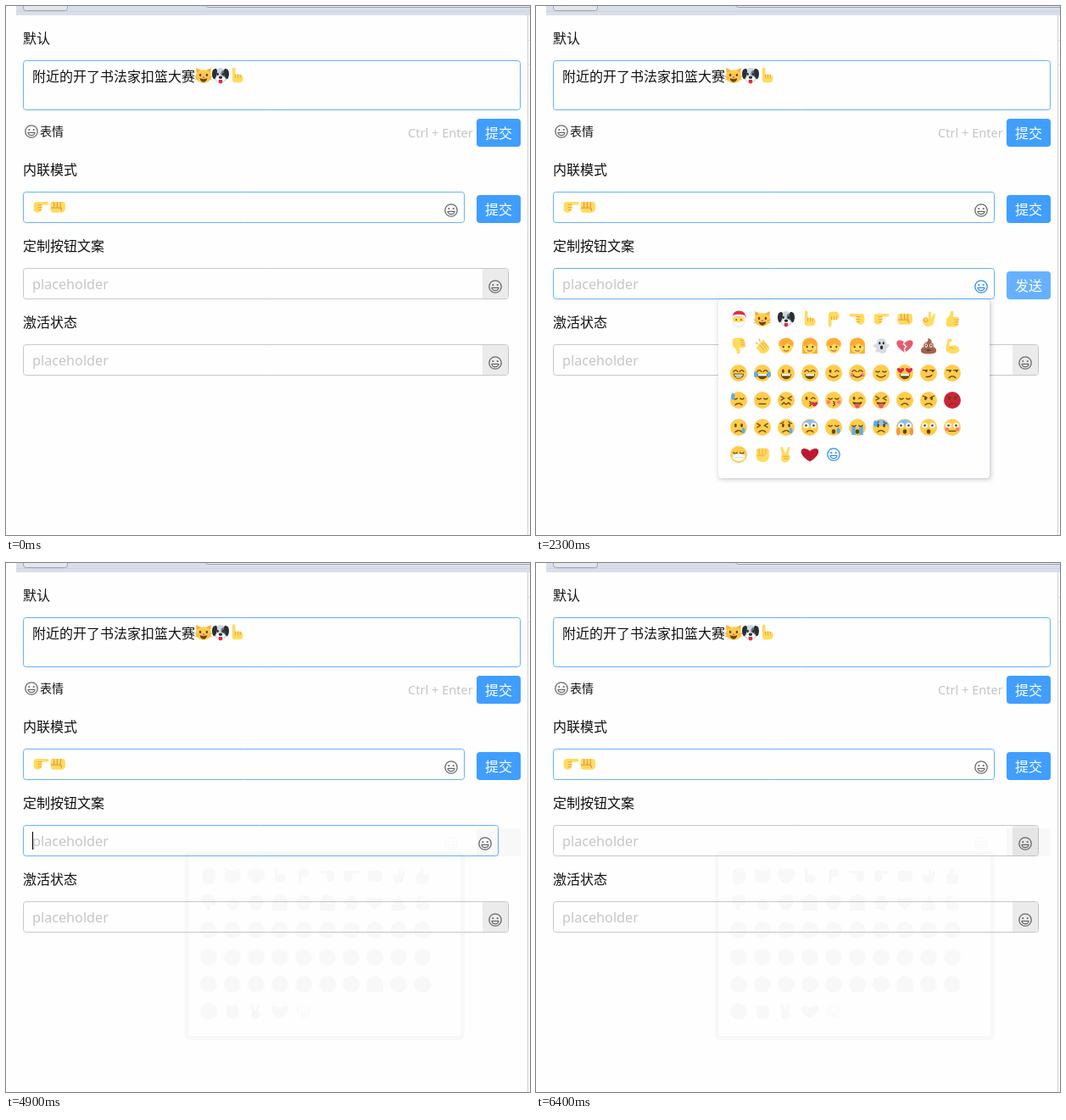
An HTML page with a canvas that plays this animation: 618 by 624 pixels, repeating every 8 s.

```html
<!DOCTYPE html>
<html lang="zh">
<head>
<meta charset="utf-8">
<title>Emoji input</title>
<style>
html, body { margin: 0; width: 100%; height: 100%; overflow: hidden; background: #fefefe; }
canvas { display: block; }
</style>
</head>
<body>
<canvas id="stage" width="618" height="624"></canvas>
<script>
const W = 618, H = 624, LOOP = 8000;
const ctx = document.getElementById('stage').getContext('2d');

const CJK = '"Noto Sans CJK SC", "Noto Sans CJK", "Noto Sans CJK JP", sans-serif';
const LATIN = '"Noto Sans", "Open Sans", sans-serif';
const PAGE = '#fefefe', BLUE = '#409eff', LIGHT = '#66b1ff', GREY = '#c8c8c8', ICON = '#66696e';

// ---- emoji, drawn on a 36 x 36 grid ----
const BROWN = '#664500', YELLOW = '#ffcc4d', SKIN = '#ffdc5d', LINE = '#ef9645', HAIR = '#ffac33';
const RED = '#dd2e44', PINK = '#e8596e', TEAR = '#5dadec', WHITE = '#fff', DARK = '#292f33';

const oval = (x, y, rx, ry = rx) =>
  `M${x - rx} ${y}a${rx} ${ry} 0 1 0 ${2 * rx} 0a${rx} ${ry} 0 1 0 ${-2 * rx} 0z`;
const pair = (dx, y, rx, ry) => oval(18 - dx, y, rx, ry) + oval(18 + dx, y, rx, ry);
const heart = (x, y, s) =>
  `M${x} ${y + s}C${x - 2 * s} ${y - .2 * s} ${x - s} ${y - 1.3 * s} ${x} ${y - .4 * s}` +
  `C${x + s} ${y - 1.3 * s} ${x + 2 * s} ${y - .2 * s} ${x} ${y + s}z`;
const GRIN = 'M8 20h20q-1 9-10 9t-10-9z';

// each part is a list of layers: colour, path, optional stroke width
const parts = {
  face: [[YELLOW, oval(18, 18, 18)]],
  rage: [[  '#d0213d', oval(18, 18, 18)]],
  pale: [['#8fc0ea', 'M.5 15a18 18 0 0 1 35 0z']],

  dots: [[BROWN, pair(6.5, 14, 2.5, 4)]],
  happy: [[BROWN, 'M7 15q4.5-6 9 0M20 15q4.5-6 9 0', 2.4]],
  shut: [[BROWN, 'M7 14q4 4 8 0M21 14q4 4 8 0', 2.2]],
  squint: [[BROWN, 'M7 10l7 4-7 4M29 10l-7 4 7 4', 2.4]],
  wink: [[BROWN, oval(11, 14, 2.5, 3.5)], [BROWN, 'M21 15q4-5 8 0', 2.2]],
  side: [[BROWN, 'M6 12h9M21 12h9', 2], [BROWN, oval(13, 14, 2.2) + oval(27, 14, 2.2)]],
  wide: [[WHITE, pair(8, 14, 6)], [BROWN, pair(8, 14, 2.5)]],
  hearts: [[RED, heart(9, 12, 6.5) + heart(27, 12, 6.5)]],
  cross: [[BROWN, 'M6 9l9 4M30 9l-9 4', 2.2]],
  worry: [[BROWN, 'M6 10q5-1 7-4M30 10q-5-1-7-4', 2]],

  smile: [[BROWN, 'M9 23q9 8 18 0', 2.4]],
  laugh: [[BROWN, 'M7 20h22q-1 11-11 11t-11-11z'], [WHITE, 'M9 20h18v4H9z']],
  teeth: [[WHITE, GRIN], [BROWN, GRIN, 1.8], [BROWN, 'M9 24.5h18', 1.2]],
  frown: [[BROWN, 'M11 28q7-7 14 0', 2.4]],
  flat: [[BROWN, 'M11 26h14', 2.4]],
  smirk: [[BROWN, 'M13 26q8 1 12-4', 2.4]],
  wave: [[BROWN, 'M9 27l4-4 5 4 5-4 4 4', 2.2]],
  kiss: [[BROWN, 'M17 21q6 1 1 4q6 2-1 5', 2]],
  open: [[BROWN, oval(18, 27, 4, 5)]],
  tongue: [[BROWN, 'M8 21q10 4 20 0q-1 8-10 8t-10-8z'], [PINK, 'M13 25h10v5a5 5 0 0 1-10 0z']],

  cheeks: [['#ff7892', pair(11, 22, 4)]],
  love: [[RED, heart(28, 26, 6)]],
  tears: [[TEAR, pair(14, 21, 4, 6)]],
  drop: [[TEAR, oval(28, 25, 3.5, 6)]],
  sweat: [[TEAR, oval(6, 10, 4, 7)]],
  stream: [[TEAR, 'M6 16h8v18h-8zM22 16h8v18h-8z']],
  palms: [[LINE, pair(14, 27, 4, 8)]],
  mask: [[WHITE, 'M5 19q13-5 26 0v8q-13 11-26 0z'], ['#ccd6dd', 'M1 15l5 4q12-5 24 0l5-4M7 24h22', 1.5]],

  point: [[SKIN, 'M3 13q0-6 8-6h21a3 3 0 0 1 0 6.4H20q3 16-8 16.6Q3 30 3 22z'],
    [LINE, 'M20 13.5h-7M20 19h-7M19 24h-6', 1.5]],
  punch: [[SKIN, 'M6 7h22q6 0 6 6v9q0 8-9 8H9q-6 0-6-7V11q0-4 3-4z'],
    [LINE, 'M10 8v11M17 8v11M24 8v11M4 20h18q5 1 4 6', 2]],
  ok: [[SKIN, 'M13 34q-9-6-7-15l8-3 4 4 0-15a2 2 0 0 1 5 0l1 12 4-9a2 2 0 0 1 4 2l-3 16q-4 10-16 8z'],
    [LINE, oval(12, 20, 4.5), 1.8]],
  thumb: [[SKIN, 'M5 18q8-6 9-13a3 3 0 0 1 7 0q0 5-2 9h10q4 1 3 6l-2 10q-1 5-6 5H13q-8 0-8-5z'],
    [LINE, 'M23 20h8M23 25h8M22 30h7', 1.5]],
  clap: [[SKIN, 'M5 22L17 7q3-3 5 0l9 11q4 8-3 13t-14 2z'],
    [LINE, 'M12 16l10 12M16 12l10 12M21 11l8 9', 1.6], [HAIR, 'M4 11l4 3M11 3l2 5', 2]],
  fist: [[SKIN, 'M5 11q0-6 6-6h15q6 0 6 6v10q0 13-13 13T5 22z'],
    [LINE, 'M11 7v10M18 6v11M25 7v10M8 20h14', 1.5]],
  peace: [[SKIN, 'M9 19L6 5a2.5 2.5 0 0 1 5-1l5 12 5-12a2.5 2.5 0 0 1 5 1l-3 13q5 3 3 9t-9 8q-10 0-10-9z'],
    [LINE, 'M12 22h10M14 27h8', 1.6]],
  muscle: [[SKIN, 'M8 4q7-3 10 1l-3 5h-4l2 9q12-6 19 2 4 12-10 13-16 0-18-9z'],
    [LINE, 'M14 20q2 4 6 3', 1.6]],

  locks: [[HAIR, 'M2 34V16Q4 1 18 1t16 15v18z']],
  head: [[HAIR, oval(18, 14, 16, 13)], [SKIN, oval(18, 20, 14)], [BROWN, pair(6, 20, 2, 2.5)],
    ['#c1694f', 'M13 27q5 4 10 0', 2]],
  fringe: [[HAIR, 'M4 18Q5 3 18 3t14 15q-8-1-11-6-6 6-17 6z']],
  santa: [[SKIN, oval(18, 19, 13)], [WHITE, 'M4 21q4 4 14 4t14-4q1 14-14 15T4 21z'],
    ['#ccd6dd', 'M5 24q2 11 13 11t13-11', 1.2], [RED, 'M4 14Q7 0 20 1t14 16l-5-4z'],
    ['#f5f5f5', 'M4 11q14-5 28 0v5q-14-5-28 0z' + oval(32, 18, 3.5)], [BROWN, pair(5, 20, 1.7)]],
  cat: [[HAIR, 'M2 2l13 6-11 14zM34 2l-13 6 11 14z'], [YELLOW, oval(18, 20, 17, 14)],
    [BROWN, pair(7, 17, 2.3, 3)], [BROWN, 'M10 24q8 3 16 0-2 8-8 8t-8-8z'],
    [PINK, oval(18, 22, 2.5, 1.7)], [LINE, 'M0 20l7 2M0 27l7-2M36 20l-7 2M36 27l-7-2', 1.2]],
  dog: [['#ccd6dd', oval(18, 18, 14, 16)], ['#66757f', oval(25, 14, 6, 7)],
    [DARK, 'M9 3Q0 3 0 14t5 12q5-5 6-18zM27 3q9 0 9 11t-5 12q-5-5-6-18z'],
    [WHITE, oval(18, 25, 9, 7)], [DARK, pair(6, 15, 2.3, 3) + oval(18, 22, 4, 3)],
    [RED, 'M14 27h8v4a4 4 0 0 1-8 0z']],
  ghost: [['#d5dde3', 'M8 14Q9 2 19 2t11 13q6-3 5 3l-5 6q0 9-8 10-7 0-9-4-7 3-7-1l3-6-7-3q-2-7 6-6z'],
    [DARK, oval(15, 12, 2, 3) + oval(23, 12, 2, 3) + oval(19, 21, 3, 4)]],
  broken: [[PINK, heart(18, 17, 15)], [WHITE, 'M19 6l-4 8 6 5-4 5 2 8', 2.6]],
  poop: [['#a8604b', 'M17 1q9 4 7 10 6 2 4 9 8 3 6 10-2 5-16 5T2 30q-2-7 6-10-2-7 4-9 6-2 5-10z'],
    [WHITE, pair(5, 17, 3, 4)], [DARK, pair(5, 17, 1.5, 2)], [DARK, 'M11 26q7 5 14 0z']],
  heart: [['#be1931', heart(18, 17, 16)]]
};

// orientation tokens: a 2 x 2 matrix around the middle
const turns = { up: [0, -1, 1, 0], down: [0, 1, 1, 0], left: [-1, 0, 0, 1], flip: [1, 0, 0, -1] };

const menu = [
  'santa,cat,dog,up point,down point,left point,point,punch,ok,thumb',
  'flip thumb,clap,head fringe,locks head fringe,head fringe,locks head fringe,ghost,broken,poop,muscle',
  'face happy teeth,face happy laugh tears,face dots laugh,face happy laugh,face wink smile,' +
    'face happy cheeks smile,face shut smile,face hearts laugh,face side smirk,face side frown',
  'face shut frown sweat,face shut flat,face squint wave,face wink kiss love,face shut cheeks kiss,' +
    'face wink tongue,face squint tongue,face shut frown,face cross dots frown,rage cross dots frown',
  'face dots frown drop,face squint frown,face worry dots frown drop,face pale wide frown,face shut open drop,' +
    'face stream shut open,face pale worry dots frown sweat,face pale wide open palms,face wide open,face wide cheeks flat',
  'face shut mask,fist,peace,heart'
].map(row => row.split(','));

function emoji(c, name, x, y) {
  c.save();
  c.translate(x, y);
  c.scale(20 / 36, 20 / 36);
  c.lineCap = c.lineJoin = 'round';
  const words = name.split(' ');
  if (turns[words[0]]) c.transform(...turns[words.shift()], 0, 0);
  c.translate(-18, -18);
  for (const word of words) {
    for (const [color, d, width] of parts[word]) {
      const path = new Path2D(d);
      if (width) {
        c.lineWidth = width;
        c.strokeStyle = color;
        c.stroke(path);
      } else {
        c.fillStyle = color;
        c.fill(path);
      }
    }
  }
  c.restore();
}

function smiley(c, x, y, color = ICON, r = 7.2) {
  c.save();
  c.translate(x, y);
  c.scale(r / 7.2, r / 7.2);
  c.strokeStyle = c.fillStyle = color;
  c.lineWidth = 1.3;
  c.stroke(new Path2D(oval(0, 0, 7.2)));
  c.fill(new Path2D(oval(-2.7, -2, 1.1) + oval(2.7, -2, 1.1)));
  c.stroke(new Path2D('M-4 1.3h8a4 3.4 0 0 1-8 0z'));
  c.restore();
}

// ---- widgets ----
function text(str, x, y, color = '#111', size = 16, font = CJK) {
  ctx.font = `${size}px ${font}`;
  ctx.fillStyle = color;
  ctx.fillText(str, x, y);
}

function round(c, x, y, w, h, r) {
  c.beginPath();
  c.roundRect(x, y, w, h, r);
}

function box(right, top, bottom, color) {
  round(ctx, 20.5, top + .5, right - 21, bottom - top - 1, 3);
  ctx.fillStyle = PAGE;
  ctx.fill();
  ctx.strokeStyle = color;
  ctx.lineWidth = 1;
  ctx.stroke();
}

function button(label, top, color, scale = 1) {
  if (!scale) return;
  ctx.save();
  ctx.translate(581, top + 16.5);
  ctx.scale(scale, scale);
  round(ctx, -26, -16.5, 52, 33, 4);
  ctx.fillStyle = color;
  ctx.fill();
  text(label, -16, 6.5, WHITE);
  ctx.restore();
}

function inlineInput(top, right, active, iconColor) {
  box(right, top, top + 37, active ? LIGHT : GREY);
  if (!active) {
    round(ctx, right - 31, top + 1, 30, 35, [0, 3, 3, 0]);
    ctx.fillStyle = '#ebebeb';
    ctx.fill();
  }
  smiley(ctx, right - 16, top + 22, iconColor);
}

const placeholder = top => text('placeholder', 31, top + 24.5, '#c6c6c6', 16.2, LATIN);

function layer(paint) {
  const canvas = document.createElement('canvas');
  canvas.width = W;
  canvas.height = H;
  paint(canvas.getContext('2d'));
  return canvas;
}

const icons = layer(c => {
  menu.forEach((row, j) => row.forEach((name, i) => emoji(c, name, 239 + 28 * i, 369 + 32 * j)));
  smiley(c, 351, 529, '#2f8cf0');
});

// faint trace the closed panel leaves behind
const trace = layer(c => {
  c.drawImage(icons, 0, 0);
  smiley(c, 525, 331);
  c.fillRect(555, 313, 52, 33);
  c.lineWidth = 5;
  round(c, 213, 342.5, 325.5, 218, 5);
  c.stroke();
  c.globalCompositeOperation = 'source-in';
  c.fillRect(0, 0, W, H);
});

function panel() {
  round(ctx, 210, 340, 331, 223, 6);
  ctx.fillStyle = 'rgba(0,0,0,.015)';
  ctx.fill();
  ctx.save();
  ctx.shadowColor = 'rgba(60,75,105,.32)';
  ctx.shadowBlur = 4;
  ctx.shadowOffsetX = ctx.shadowOffsetY = 1;
  round(ctx, 215, 346, 320, 211, 4);
  ctx.fillStyle = PAGE;
  ctx.fill();
  ctx.restore();
  ctx.drawImage(icons, 0, 0);
}

function chrome() {
  ctx.fillStyle = PAGE;
  ctx.fillRect(0, 0, W, H);
  ctx.fillStyle = '#d9dfe9';
  ctx.fillRect(12, 0, 606, 11);
  ctx.fillStyle = '#cdd5e2';
  ctx.fillRect(12, 6, 606, 1);
  ctx.lineWidth = 1;
  ctx.strokeStyle = '#9da3ac';
  round(ctx, 20.5, -10, 52, 15.5, 3);
  ctx.fillStyle = '#e3e6ea';
  ctx.fill();
  ctx.stroke();
  round(ctx, 235.5, -10, 400, 11.5, 3);
  ctx.fillStyle = '#eceff3';
  ctx.fill();
  ctx.stroke();
  ctx.fillStyle = '#cfcfcf';
  ctx.fillRect(615, 11, 1, H);
  ctx.fillStyle = '#e4e4e4';
  ctx.fillRect(616, 40, 2, 1);
  ctx.fillRect(616, 69, 2, 1);
}

// ---- timeline: time, input's right edge, button scale ----
const slide = [
  [0, 593, 0],
  [800, 581, 0], [900, 550, .8], [1000, 541, 1],
  [3700, 573, .31], [3800, 590, .05], [3900, 593, 0],
  [4900, 581, 0], [5000, 550, .8], [5100, 541, 1],
  [6200, 573, .31], [6300, 590, .05], [6400, 593, 0]
];
const within = (t, ...spans) => spans.some(([from, to]) => t >= from && t < to);

function draw(t) {
  const [, right, scale] = slide.filter(s => s[0] <= t).pop();
  const active = within(t, [800, 3700], [4900, 6200]);
  const caret = within(t, [800, 1300], [1800, 2100], [4900, 5400], [5900, 6100]);
  const open = within(t, [2300, 3700]);

  chrome();
  text('默认', 20, 44);
  text('内联模式', 20, 199);
  text('定制按钮文案', 20, 289);
  text('激活状态', 20, 379);

  box(607, 64, 123, LIGHT);
  text('附近的开了书法家扣篮大赛', 31, 89);
  ['cat', 'dog', 'up point'].forEach((name, i) => emoji(ctx, name, 233 + 20 * i, 82));
  smiley(ctx, 30, 148);
  text('表情', 40, 153, '#111', 14);
  text('Ctrl + Enter', 474, 155, '#c3c5c9', 14.6, LATIN);
  button('提交', 133, BLUE);

  inlineInput(219, 541, true);
  emoji(ctx, 'point', 41, 237);
  emoji(ctx, 'punch', 61, 237);
  button('提交', 223, BLUE);

  button('发送', 313, LIGHT, scale);
  inlineInput(309, right, active, open ? '#2f8cf0' : ICON);
  placeholder(309);
  if (caret) {
    ctx.fillStyle = '#000';
    ctx.fillRect(31, 317, 1, 21);
  }

  inlineInput(399, 593, false);
  placeholder(399);

  if (open) panel();
  if (t >= 3700) {
    ctx.globalAlpha = .02;
    ctx.drawImage(trace, 0, 0);
    ctx.globalAlpha = 1;
  }
}

const start = performance.now();
function tick() {
  draw((performance.now() - start) % LOOP);
  requestAnimationFrame(tick);
}
tick();
</script>
</body>
</html>
```
